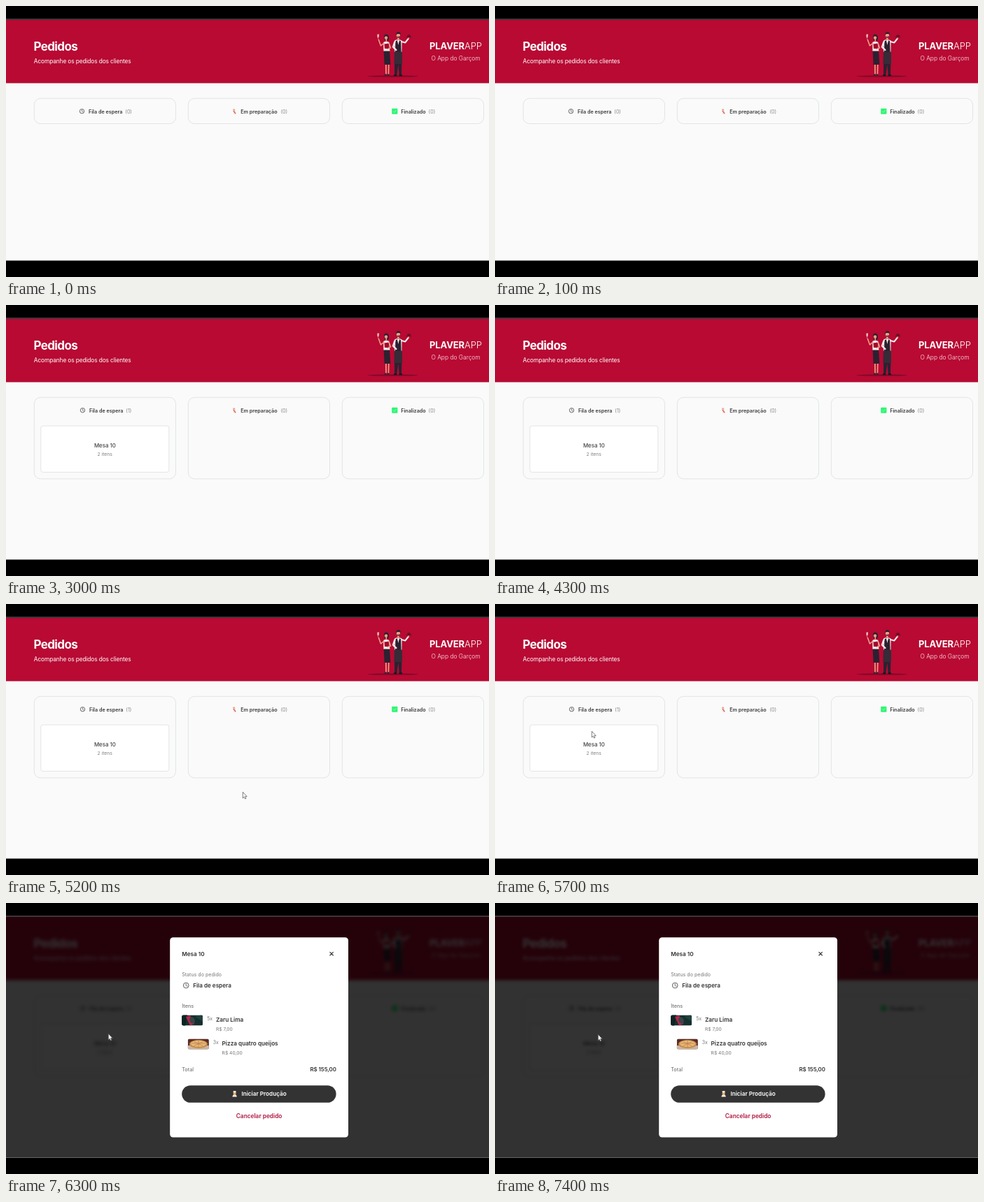
Animation, 690 px wide and 388 px high, one loop 8 s. Source, as an HTML page:

```html
<!DOCTYPE html>
<html lang="pt">
<head>
<meta charset="utf-8">
<title>Pedidos</title>
<style>
  html, body { margin: 0; width: 100%; height: 100%; overflow: hidden; background: #000; }
  svg { display: block; width: 100vw; height: 100vh; }
  text { font-family: Inter, "Open Sans", sans-serif; white-space: pre; }
</style>
</head>
<body>
<svg id="stage" viewBox="0 0 690 388" xmlns="http://www.w3.org/2000/svg"></svg>
<script>
const LOOP = 8000, ORDER_AT = 1400, MODAL_AT = 6300;

// Pointer tip: time, x, y. Each position holds until the next.
const POINTER = [
  [4600, 587, 286], [4700, 514, 293], [4800, 440, 296], [4900, 381, 288],
  [5000, 343, 278], [5100, 329, 271], [5200, 338, 269],
  [5400, 254, 229], [5500, 178, 198], [5600, 139, 179], [5700, 138, 182],
  [5900, 141, 184], [6000, 143, 186], [6100, 145, 187], [6200, 146, 187],
  [6400, 147, 188]
];

const text = (x, y, size, weight, fill, str, extra = '') =>
  `<text x="${x}" y="${y}" font-size="${size}" font-weight="${weight}" fill="${fill}" ${extra}>${str}</text>`;

const rect = (x, y, w, h, r, fill, extra = '') =>
  `<rect x="${x}" y="${y}" width="${w}" height="${h}" rx="${r}" fill="${fill}" ${extra}/>`;

const path = (d, fill, extra = '') => `<path d="${d}" fill="${fill}" ${extra}/>`;

const line = (d, color, width) =>
  path(d, 'none', `stroke="${color}" stroke-width="${width}" stroke-linecap="round" stroke-linejoin="round"`);

const dot = (x, y, r, fill, extra = '') => `<circle cx="${x}" cy="${y}" r="${r}" fill="${fill}" ${extra}/>`;

const clock = (x, y, r) =>
  dot(x, y, r, '#f1f1f1', 'stroke="#6a6a6a" stroke-width="1"') +
  line(`M${x} ${y - r * .6}V${y}L${x + r * .5} ${y + r * .3}`, '#555', .7);

const cook = (x, y, hair, coat) =>
  `<g transform="translate(${x} ${y})">` +
  path('M-3.2 4.2Q-3 .8 0 .8T3.2 4.2Z', coat) +
  dot(0, -.4, 2.1, '#f5b95c') +
  path('M-2.3 -.2Q-2.4 -2.2 0 -2.1T2.3 -.2L1.4 -1.2H-1.4Z', hair) +
  path('M-1.7 -1.7L-2.2 -3.6Q-1.4 -4.8 0 -4.3Q1.4 -4.8 2.2 -3.6L1.7 -1.7Z', '#f4efe9') +
  '</g>';

const smallCook = (x, y) =>
  `<g transform="translate(${x} ${y})">` +
  path('M-2.2 -3.4H.6L1 -1H-1.8Z', '#e9a08c') +
  path('M-1.8 -1H1.2L2.4 3.6H-1Z', '#f0d9cf') +
  line('M-1.2 -.4L1.6 3', '#d9583f', 1.1) + '</g>';

const check = (x, y) =>
  rect(x, y, 8.2, 8, .8, '#2df573') +
  line(`M${x + 2.2} ${y + 4.2}l1.4 1.4l2.6 -3.2`, '#9dfbc0', .8);

const waiters = () => {
  const skin = '#e9a183', ink = '#2b2130', cloth = '#f5eaea', wine = '#a3082c';
  return '<ellipse cx="552.5" cy="100.6" rx="36.5" ry="1.1" fill="#7c0a28"/>' +
    // woman with a glass
    line('M542.8 82L543 98M546.8 82L546.4 98', skin, 1.7) +
    path('M541.4 97.4h2.4v2.2h-3.4zM545.2 97.4h2.4v2.2h-3.4z', ink) +
    path('M539.6 64H548L549.4 84H540.6Z', ink) +
    path('M539.2 52Q543 49.6 547.4 52L548.4 64.4H539.4Z', cloth) +
    line('M539.8 53.4L535.4 56.8L532.4 48.4', skin, 1.6) +
    path('M540.4 54.6L546.6 53.4L547.8 61H541Z', wine) +
    line('M547.4 54L549.6 60L544.8 61.6', skin, 1.5) +
    path('M530.4 40.6h2.6l-.4 4l-.8 .8v2.4h-.5v-2.4l-.8 -.8z', '#f0c6bf') +
    path('M540 44Q540.4 40.4 543.6 40.6T547 46L546.4 49.4H541Z', ink) +
    dot(543, 45.4, 2.2, skin) + rect(542.4, 47, 1.7, 3.6, .6, skin) +
    // man with a tray
    path('M555 66H565.6L565 98.6H561.6L560.4 84L558.4 98.6H555Z', ink) +
    path('M554.6 98H558.4V100.2H553.4ZM561.6 98H565.4L566.4 100.2H561.4Z', '#1c1620') +
    path('M555 49.4Q560 46.8 565.6 49.4L565.4 66.6H555Z', cloth) +
    path('M556.4 50.4L559 49L560.4 54L562 49L564.2 50.4L564.6 66.4H555.8Z', ink) +
    path('M559 49L560.4 56L562 49Z', cloth) +
    path('M554.8 65.4H565.8L566 83H554.4Z', '#372b38') +
    line('M555.4 51.4L553 58.6L557.4 63', cloth, 2.4) +
    line('M565 51L570.4 52.4L574.6 47', cloth, 2.1) +
    dot(575.2, 46, 1.1, skin) +
    rect(571.4, 44.4, 8, .9, .4, '#5d1426') +
    path('M572.6 44.4Q573 41 575.6 41T578.6 44.4Z', '#6d1026') +
    rect(559.2, 44.4, 2.4, 4.8, .8, skin) +
    dot(560.4, 42, 2.7, skin) +
    path('M557.4 42.4Q556.8 37 560.8 37.2Q564.6 37.4 563.4 41.4L562.4 40H558.6Z', ink) +
    path('M558.2 43.4Q560.4 44.6 563 43.2Q562.6 45.8 560.6 45.6T558.2 43.4Z', ink);
};

const columns = [
  { x: 40, title: 'Fila de espera', tx: 118, cx: 170.3, icon: clock(108.5, 150.7, 3.2) },
  { x: 260, title: 'Em preparação', tx: 335.2, cx: 392.4, icon: smallCook(326.3, 150.8) },
  { x: 480, title: 'Finalizado', tx: 564.2, cx: 603.6, icon: check(551.2, 146.8) }
];

const column = (c, i) =>
  rect(c.x + .3, 132.3, 202.2, 36.2, 9, '#fafafa', 'class="col" stroke="#e2e4e4" stroke-width="1"') +
  `<g ${i ? '' : 'id="queue"'}>` + c.icon +
  text(c.tx, 153.5, 7.2, 600, '#3c3c3c', c.title) +
  text(c.cx, 153.5, 7.1, 400, '#858585', '(0)', i ? '' : 'id="count"') + '</g>';

const page =
  rect(-40, -40, 770, 470, 0, '#fafafa') +
  rect(-40, -40, 770, 150.5, 0, '#b80a33') +
  text(39.6, 64.3, 17, 700, '#fff', 'Pedidos', 'letter-spacing="-.65"') +
  text(39.8, 81.8, 8.4, 400, '#fff', 'Acompanhe os pedidos dos clientes', 'letter-spacing="-.14"') +
  waiters() +
  text(605, 62.4, 13, 700, '#fff', 'PLAVER<tspan font-weight="300">APP</tspan>', 'letter-spacing="-.1"') +
  text(607.4, 78, 8.45, 300, '#fbe6ea', 'O App do Garçom') +
  columns.map(column).join('') +
  '<g id="order">' +
  rect(49.8, 173, 183, 66.4, 3, '#fff', 'stroke="#e0e1e1" stroke-width=".9"') +
  text(141.4, 203.6, 7.9, 500, '#444', 'Mesa 10', 'text-anchor="middle"') +
  text(141.2, 215.8, 6.8, 400, '#808080', '2 itens', 'text-anchor="middle"') +
  '</g>';

const item = (x, y, count, name, price) =>
  text(x + 36, y + 8.4, 6.9, 400, '#777', count + 'x') +
  text(x + 48.8, y + 9.6, 8.2, 600, '#333', name) +
  text(x + 48.8, y + 23.4, 6.7, 400, '#777', price);

const photos =
  '<g clip-path="url(#thumbA)">' + rect(251, 160.4, 30, 15.2, 0, '#16302f') +
  path('M251 160H259L256 176H251Z', '#0f2224') +
  path('M257 163L263 161L269 173L263 175.6Z', '#b3274a') +
  '<ellipse cx="266" cy="168" rx="3.6" ry="5" fill="#39444a" transform="rotate(-24 266 168)"/>' +
  path('M270 162L281 160V170Z', '#20413e') + '</g>' +
  '<g clip-path="url(#thumbB)">' + rect(259.6, 194.4, 30.4, 15.2, 0, '#5a2b26') +
  path('M259 204H290V210H259Z', '#c9b6a4') +
  '<ellipse cx="275" cy="202" rx="13" ry="6" fill="#c98a4a"/>' +
  '<ellipse cx="275" cy="201.4" rx="11" ry="4.6" fill="#e6b878"/>' +
  line('M275 197V206M266 201H284M269 198.6L281 204.6M281 198.6L269 204.6', '#b87a42', .7) + '</g>';

const modal =
  rect(234.2, 49.2, 254.8, 286.4, 4.6, '#fff') +
  text(251.2, 75.6, 8.2, 600, '#333', 'Mesa 10') +
  line('M462.8 70.4L467.4 75M467.4 70.4L462.8 75', '#333', 1.1) +
  text(251.2, 105.2, 7.1, 400, '#777', 'Status do pedido') +
  clock(257.2, 118, 3.9) +
  text(267.2, 121, 8.15, 600, '#333', 'Fila de espera') +
  text(251.2, 149.6, 7.3, 500, '#777', 'Itens') +
  photos +
  item(251.2, 160, 5, 'Zaru Lima', 'R$ 7,00') +
  item(259.8, 194, 3, 'Pizza quatro queijos', 'R$ 40,00') +
  text(251.2, 241.2, 7.3, 400, '#666', 'Total') +
  text(471.8, 241.4, 7.8, 600, '#333', 'R$ 155,00', 'text-anchor="end"') +
  rect(251.2, 261.2, 220.4, 24.6, 12.3, '#333') +
  cook(326.6, 273.4, '#8a4b24', '#f4efe9') +
  text(336.4, 276.4, 8.2, 600, '#fff', 'Iniciar Produção') +
  text(361.6, 308.2, 8.3, 600, '#b01740', 'Cancelar pedido', 'text-anchor="middle"');

const clip = (id, shape) => `<clipPath id="${id}">${shape}</clipPath>`;
const view = (fill, extra) => rect(0, 20, 690, 344.5, 0, fill, extra);

const stage = document.getElementById('stage');
stage.innerHTML =
  '<defs>' + clip('view', view('#000')) +
  clip('thumbA', rect(251.2, 160.4, 30, 15.2, 2.4, '#000')) +
  clip('thumbB', rect(259.8, 194.4, 30, 15.2, 2.4, '#000')) + '</defs>' +
  rect(0, 0, 690, 388, 0, '#000') +
  rect(0, 18, 690, 2, 0, '#41343a') +
  `<g clip-path="url(#view)"><g id="page">${page}</g>` +
  `<g id="modal">${view('#000', 'opacity=".8"')}${modal}</g></g>` +
  '<g id="pointer">' +
  path('M.3 .2V9L2.2 7.2L3.5 10L4.9 9.4L3.7 6.6H6.2Z', '#fff', 'stroke="#555" stroke-width=".75" stroke-linejoin="round"') +
  '</g>';

const part = id => document.getElementById(id);
const show = (id, on) => part(id).setAttribute('visibility', on ? 'visible' : 'hidden');
const boxes = stage.querySelectorAll('.col');

function draw(t) {
  const ordered = t >= ORDER_AT, open = t >= MODAL_AT;
  boxes.forEach(b => b.setAttribute('height', ordered ? 116.6 : 36.2));
  part('queue').setAttribute('transform', `translate(${ordered ? 1 : 0} 0)`);
  part('count').textContent = ordered ? '(1)' : '(0)';
  show('order', ordered);
  show('modal', open);
  part('page').style.filter = open ? `blur(${t < MODAL_AT + 100 ? 2.8 : 2.3}px)` : 'none';

  const spot = POINTER.filter(p => p[0] <= t).pop();
  show('pointer', !!spot);
  if (spot) part('pointer').setAttribute('transform', `translate(${spot[1]} ${spot[2]})`);
}

const start = performance.now();
function tick() {
  draw((performance.now() - start) % LOOP);
  requestAnimationFrame(tick);
}
tick();
</script>
</body>
</html>
```
